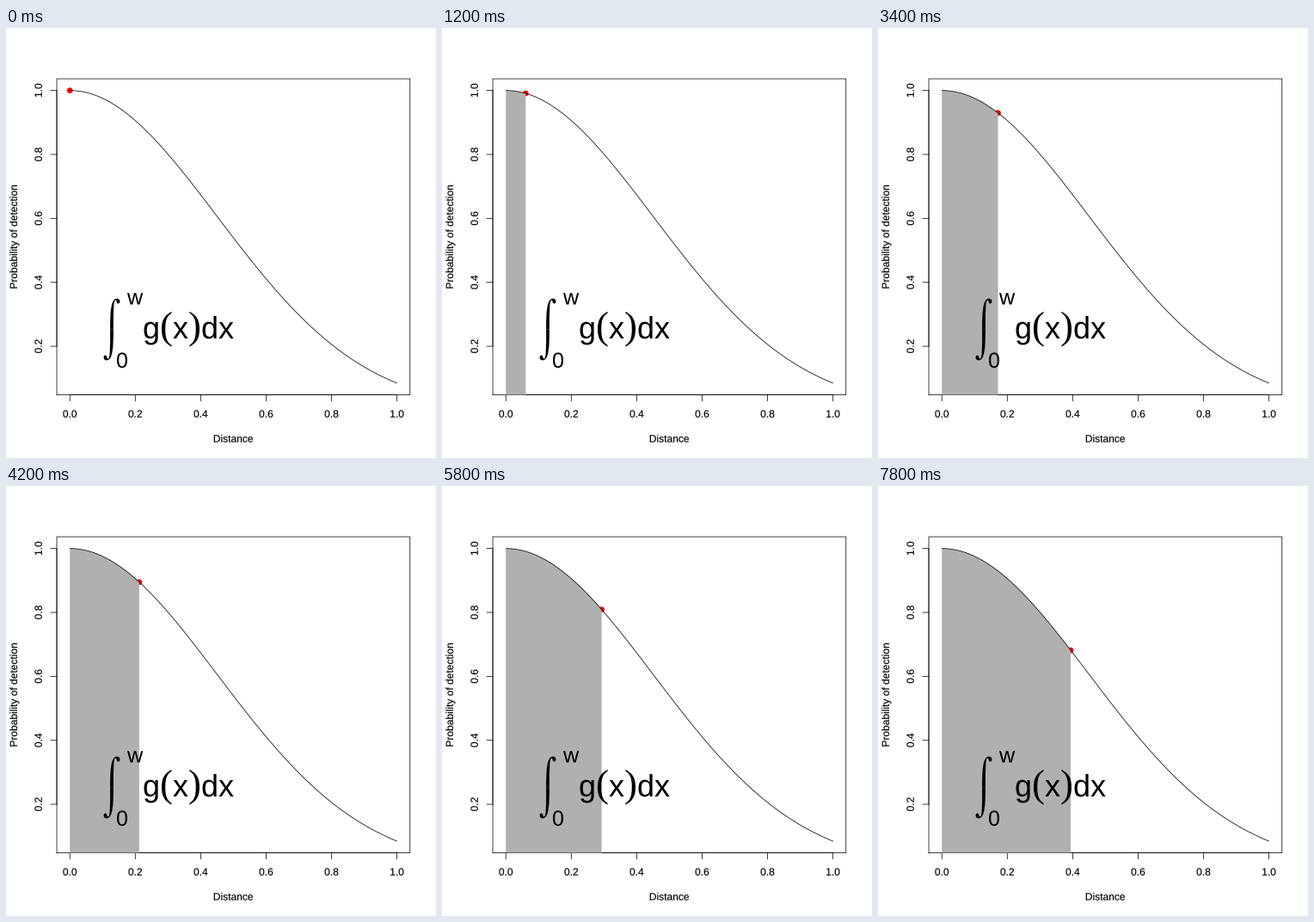
A matplotlib script for the animation above (8 s loop, 500x500 px).

```python
import numpy as np
import matplotlib.pyplot as plt
from matplotlib.animation import FuncAnimation
from matplotlib.patches import Circle, PathPatch, Polygon
from matplotlib.path import Path
from matplotlib.textpath import TextPath
from matplotlib.transforms import Affine2D

SIZE, DPI = 500, 100
PX = 72 / DPI                      # points per pixel
LINE = 14.4                        # height of one margin line
LEFT, TOP = 4.1 * LINE, 4.1 * LINE
RIGHT, BOTTOM = SIZE - 2.1 * LINE, SIZE - 5.1 * LINE
SIGMA = 0.45
FRAMES, INTERVAL = 40, 200
SANS, SERIF = "Liberation Sans", "Liberation Serif"
STROKE = dict(color="black", lw=0.75 * PX, solid_capstyle="round",
              solid_joinstyle="round", snap=False)


def detect(x):
    return np.exp(-x ** 2 / (2 * SIGMA ** 2))


LOW = detect(1.0)


def px(x):
    return LEFT + (RIGHT - LEFT) * (x + 0.04) / 1.08


def py(y):
    pad = 0.04 * (1 - LOW)
    return BOTTOM - (BOTTOM - TOP) * (y - LOW + pad) / (1.08 * (1 - LOW))


fig = plt.figure(figsize=(SIZE / DPI, SIZE / DPI), dpi=DPI, facecolor="white")
ax = fig.add_axes([0, 0, 1, 1])
ax.set_xlim(0, SIZE)
ax.set_ylim(SIZE, 0)
ax.axis("off")


def line(xs, ys, z=1):
    ax.plot(xs, ys, zorder=z, **STROKE)


def glyphs(text, x, y, size, font=SANS, angle=0, centre_as=None, edge=0.0):
    """Draw text from its baseline origin, or centred by a reference string."""
    path = TextPath((0, 0), text, size=size, prop={"family": font})
    shift = 0
    if centre_as:
        box = TextPath((0, 0), centre_as, size=size,
                       prop={"family": font}).get_extents()
        shift = -(box.x0 + box.x1) / 2
    place = (Affine2D().translate(shift, 0).scale(1, -1)
             .rotate_deg(-angle).translate(x, y))
    ax.add_patch(PathPatch(place.transform_path(path), fc="black", ec="black",
                           lw=edge * PX, zorder=6, snap=False))


def label(text, x, y, angle=0, ref=None):
    glyphs(text, x, y, 12, angle=angle, centre_as=ref or text, edge=0.15)


def draw_axes():
    line([LEFT, RIGHT, RIGHT, LEFT, LEFT], [BOTTOM, BOTTOM, TOP, TOP, BOTTOM])
    tick = LINE / 2
    line([px(0), px(1)], [BOTTOM, BOTTOM])
    for v in np.arange(6) / 5:
        line([px(v)] * 2, [BOTTOM, BOTTOM + tick])
        label(f"{v:.1f}", px(v), BOTTOM + 1.82 * LINE, ref="0.0")
    line([LEFT, LEFT], [py(0.2), py(1)])
    for v in np.arange(1, 6) / 5:
        line([LEFT - tick, LEFT], [py(v)] * 2)
        label(f"{v:.1f}", LEFT - 1.2 * LINE, py(v), 90, ref="0.0")
    label("Distance", (LEFT + RIGHT) / 2, BOTTOM + 3.82 * LINE)
    label("Probability of detection", LEFT - 3.2 * LINE, (TOP + BOTTOM) / 2, 90)


def draw_integral():
    # Upper half of the sign; the lower half is the same shape turned over.
    half = np.array([
        (121.1, 350.5),
        (121.1, 331), (121.6, 314.6), (129, 314.6),
        (133.2, 314.6), (133.4, 320.4), (130.5, 320.4),
        (128.3, 320.4), (129, 317.2), (127.7, 316.5),
        (124.6, 315.6), (124.9, 330), (124.9, 350.5)])
    codes = [Path.MOVETO] + [Path.CURVE4] * 12
    for verts in (half, np.array([246, 701]) - half):
        ax.add_patch(PathPatch(Path(verts, codes), fc="black", lw=0,
                               zorder=6, snap=False))
    glyphs("w", 141, 321.5, 25.2)
    glyphs("0", 128, 395, 25.2)
    base = 361
    for text, x in (("g", 159), ("x", 194), ("dx", 227)):
        glyphs(text, x, base, 36)
    for text, x in (("(", 179), (")", 212)):
        glyphs(text, x, base, 45, SERIF)


grid = np.linspace(0, 1, 100)
curve = np.column_stack([px(grid), py(detect(grid))])

draw_axes()
draw_integral()
line(curve[:, 0], curve[:, 1], z=4)
dot = ax.add_patch(Circle(curve[0], 3.375, fc="#ff0000", lw=0, zorder=2))
area = ax.add_patch(Polygon(curve[:2], fc="#b0b0b0", lw=0, zorder=3,
                            snap=False))


def update(i):
    dot.center = tuple(curve[i])
    area.set_visible(i > 0)
    foot = [(curve[i, 0], BOTTOM), (curve[0, 0], BOTTOM)]
    area.set_xy(np.vstack([curve[:i + 1], foot]))
    return dot, area


anim = FuncAnimation(fig, update, frames=FRAMES, interval=INTERVAL,
                     init_func=lambda: update(0), repeat=True, repeat_delay=0)
plt.show()
```
